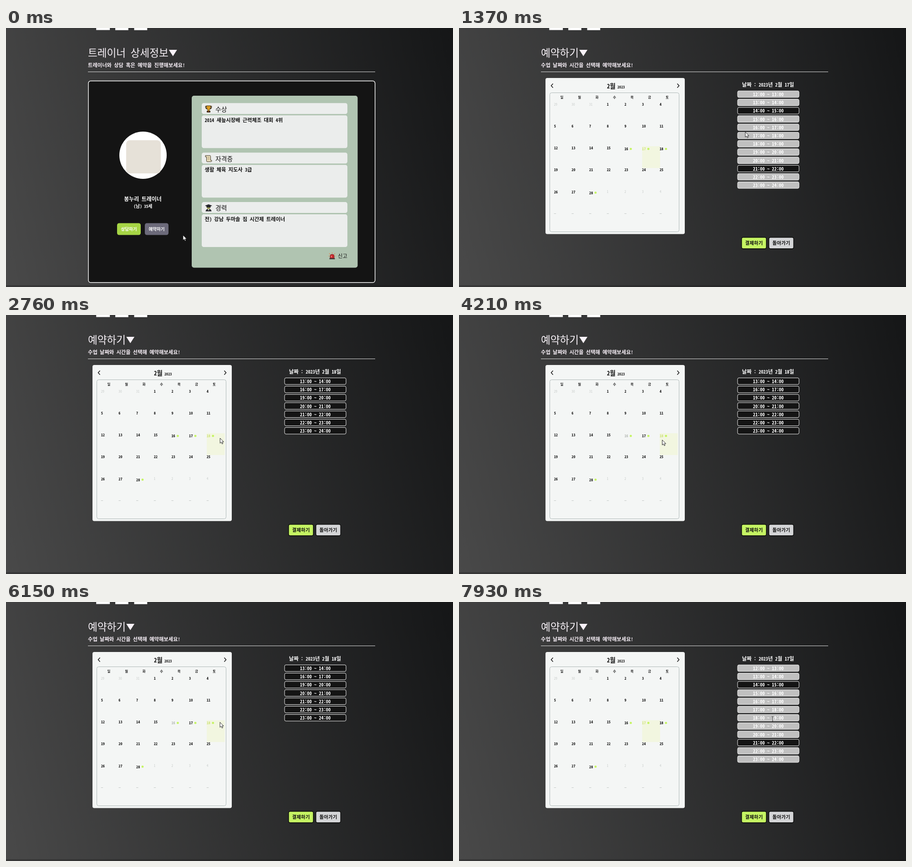
These frames come from a looping animation (982x570 px, 8 s). An HTML page:

```html
<!DOCTYPE html>
<html lang="ko">
<head>
<meta charset="utf-8">
<title>예약하기</title>
<style>
html, body { margin: 0; width: 100%; height: 100%; overflow: hidden; }
body { background: linear-gradient(75deg, #494949, #151617); }
svg { display: block; width: 982px; height: 570px; }
text {
  font-family: "Noto Sans Mono CJK KR", "Noto Sans CJK KR", "Noto Sans CJK", monospace;
  font-weight: 700;
  white-space: pre;
}
.plain { font-weight: 400; }
.hangul { font-size: 1.087em; }
.status { font: 400 9px "Open Sans", "Noto Sans", sans-serif; }
</style>
</head>
<body>
<svg viewBox="0 0 982 570">
  <g id="page"></g>
  <g id="cursor"></g>
</svg>
<script>
const LOOP = 8000, PAGE_AT = 340, LOADED_AT = 740;
const DARK = '#141414', WHITE = '#fff', LIME = '#c5f463';

// Hangul syllables are 0.92 em wide in the font; enlarge them to a full em cell
const fullWidth = str => String(str).replace(/[가-힣]+/g, s => `<tspan class="hangul">${s}</tspan>`);
// y is the vertical middle of the text
const text = (x, y, size, str, fill = WHITE, extra = '') =>
  `<text x="${x}" y="${y + size * 0.38}" style="font-size:${size}px" fill="${fill}" ${extra}>${fullWidth(str)}</text>`;
const plain = (x, y, size, str, fill) => text(x, y, size, str, fill, 'class="plain"');
const mid = (x, y, size, str, fill) => text(x, y, size, str, fill, 'text-anchor="middle"');
const rect = (x, y, w, h, r, fill, stroke = 'none', sw = 1) =>
  `<rect x="${x}" y="${y}" width="${w}" height="${h}" rx="${r}" fill="${fill}" stroke="${stroke}" stroke-width="${sw}"/>`;
const path = (d, fill, stroke = 'none', sw = 1) =>
  `<path d="${d}" fill="${fill}" stroke="${stroke}" stroke-width="${sw}"/>`;
const circle = (x, y, r, fill) => `<circle cx="${x}" cy="${y}" r="${r}" fill="${fill}"/>`;
const at = (x, y, body) => `<g transform="translate(${x} ${y})">${body}</g>`;

function header(title, note) {
  const end = 180 + title.length * 20.8 - (title.includes(' ') ? 10.4 : 0);
  return rect(0, 566, 982, 4, 0, 'rgba(20,20,20,.3)') +
    text(192, -14.5, 41.5, '블롬름') +
    plain(180, 55, 20.8, title, '#f8f2f8') +
    path(`M${end + 1} 48h18l-9 14z`, '#f8f2f8') +
    text(180, 82, 10.4, note, '#f8f0f8') +
    rect(180, 96, 631, 1, 0, '#dcdcdc');
}

// Icons are drawn from their upper left corner, about 16 px wide
const icons = {
  trophy:
    path('M4 2H1.5Q1 7 5 8M12 2h2.5Q15 7 11 8', 'none', '#3a2a10', 1.5) +
    path('M3.5 .8h9Q13 8 9.3 10v2h2.2v3h-7v-3h2.2v-2Q3 8 3.5 .8z', '#d99a22', '#3a2a10') +
    rect(4.5, 12.6, 7, 2.4, 0, '#4a2c18'),
  scroll:
    path('M1 1.5h10q1.5 0 1.5 2V12H15v1.5q0 1.5-1.5 1.5H5q-1.5 0-1.5-1.5V4.5H1z', '#eadfbe', '#3c3426') +
    path('M5.5 5h5M5.5 7.5h5M5.5 10h5', 'none', '#a08c60', .8),
  graduate:
    path('M1.5 15.5Q2 10 8 10t6.5 5.5z', '#2b2b30') +
    circle(8, 7, 3.6, '#9a9a50') +
    path('M0 3l8-3 8 3-3.5 1.5V7h-9V4.5z', '#26262c') +
    path('M6 10.5h4L8 14z', '#e8e8e0'),
  siren:
    path('M4 13V8q0-4 4.5-4T13 8v5z', '#c8282c', '#6c2020', .8) +
    rect(2.5, 12.5, 12, 2.5, .5, '#443c3c') +
    path('M8.5 0v2M2 2l2 2M15 2l-2 2M0 8h2.5M17 8h-2.5', 'none', '#e08850', 1.2) +
    rect(6, 7, 2, 4, .8, '#ee7c78')
};

function profile() {
  const sections = [
    ['trophy', '수상', '2014 새늪시장배 근력체조 대회 4위'],
    ['scroll', '자격증', '생활 체육 지도사 3급'],
    ['graduate', '경력', '전) 강남 두마솔 짐 시간제 트레이너']
  ];
  return header('트레이너 상세정보', '트레이너와 상담 혹은 예약을 진행해보세요!') +
    rect(181, 116.5, 629.7, 443.7, 5, DARK, WHITE, 1.4) +
    circle(301, 280, 52, WHITE) +
    rect(264, 247, 76, 73, 8, '#e6e1d8') +
    mid(300.5, 377, 11, '봉누리 트레이너') +
    mid(301, 392.5, 9.1, '(남) 35세') +
    rect(244, 429.5, 52, 26, 4.5, '#a6d545') + mid(270, 443, 8.8, '상담하기') +
    rect(305, 429.5, 52, 26, 4.5, '#6c6a7a') + mid(331, 443, 8.8, '예약하기') +
    rect(408, 149, 364.5, 378.5, 5, '#b0c4b1') +
    sections.map(([icon, name, line], i) => {
      const y = 165.3 + i * 108.9;
      return rect(430, y, 320, 24, 4.5, '#ebedec') +
        rect(430, y + 27, 320, 72, 4.5, '#ebedec') +
        at(437, y + 5, icons[icon]) +
        plain(460, y + 13.5, 12.7, name, '#111') +
        text(436.5, y + 37.5, 10.4, line, '#111');
    }).join('') +
    at(708, 494, icons.siren) + plain(729, 502, 10.4, '신고', '#111');
}

// Clicks on a day: the list empties 70 ms later and refills after 140 ms
const clicks = [[LOADED_AT - 140, 17], [2330, 18], [5130, 28], [6100, 18], [7590, 17]];
const lastClick = t => Math.max(0, clicks.findLastIndex(c => c[0] <= t));

function calendar(t) {
  const picked = clicks[lastClick(t)][1], loaded = t >= LOADED_AT;
  let out = rect(190, 110, 306, 343.5, 4, '#f4f6f5') +
    rect(199.5, 142.5, 284, 306, 4, 'none', '#aeb8b8') +
    path('M206.5 122.5l-4 4.5 4 4.5M479.5 122.5l4 4.5-4 4.5', 'none', '#111', 1.5) +
    text(325, 128, 12.6, '2월', '#111') + text(348, 129.5, 8.2, '2023', '#111');
  [...'일월화수목금토'].forEach((d, c) => out += mid(226 + c * 38.55, 152, 6.8, d, '#222'));

  for (let n = 0; n < 42; n++) {
    const x = 208.7 + (n % 7) * 38.67, row = Math.floor(n / 7), y = 168 + row * 48.1;
    const day = n - 2, inside = day >= 1 && day <= 28;
    if (row === 5) { out += rect(x, 408, 4.5, 1, 0, '#c3c8c6'); continue; }
    if (!inside) { out += plain(x, y, 7.2, day < 1 ? day + 31 : day - 28, '#c6cac8'); continue; }
    const event = loaded && [16, 17, 18, 28].includes(day);
    if (day === picked) out += rect(x + .3, y - 4, 39.5, 48, 0, '#f2f6e0');
    const fill = day === picked ? '#cde278' : day === 16 && t >= 3460 && t < 7300 ? '#b4b8b4' : '#111';
    out += text(x, y + (event ? 2 : 0), 8.3, day, fill);
    if (event) out += circle(x + 14, y + 2, 2.4, LIME);
  }
  return out;
}

function slots(t) {
  const i = lastClick(t), [clickedAt, picked] = clicks[i], age = t - clickedAt;
  let out = mid(679, 125, 10.4, `날짜 : 2023년 2월 ${picked}일`);
  if (t < LOADED_AT || (age >= 70 && age < 140))
    return out + mid(679.5, 174, 9.1, '예약 가능한 시간이 없습니다.');
  const shown = age < 70 ? clicks[i - 1][1] : picked;
  const hours = shown === 17 ? Array.from({ length: 12 }, (_, k) => 12 + k) : [13, 16, 19, 20, 21, 22, 23];
  hours.forEach((h, k) => {
    const y = 138.4 + k * 18.2, open = shown !== 17 || h === 14 || h === 21;
    out += rect(612, y, 135, 14.4, 3, open ? DARK : '#c0c0c0', '#f2f2f2') +
      mid(679.5, y + 7.7, 10.4, `${h}:00 ~ ${h + 1}:00`);
  });
  return out;
}

function booking(t) {
  return header('예약하기', '수업 날짜와 시간을 선택해 예약해보세요!') +
    calendar(t) + slots(t) +
    rect(620.75, 460.75, 54.5, 25, 3.5, LIME, '#080808', 1.5) + mid(648, 473.5, 9.7, '결제하기', '#111') +
    rect(680.75, 460.75, 54.5, 25, 3.5, '#d4d5d7', '#080808', 1.5) + mid(708, 473.5, 9.7, '돌아가기', '#111');
}

const status = () => rect(-4, 558, 99, 16, 3, '#b9c3c9') +
  text(0, 567.5, 9, 'board/lessonscheduler', '#50565c', 'class="status"');

// Pointer shapes and route: time, x, y, shape from that time on
const shapes = {
  arrow: path('M0 0V11.2L2.6 8.8 4.4 12.8 6.3 12 4.6 8.2H8z', WHITE, '#111', .9),
  hand: path('M-1.2 1.2a1.2 1.2 0 0 1 2.4 0V6l4 .9q1.6.4 1.4 2l-.6 4.3-1 2.8H-.4L-4.3 10q.2-1.7 1.8-.9l1.3 1.2z', WHITE, '#111', .9),
  beam: path('M-2 -6h1.5l.5.5.5-.5H2M0 -5.5V5.5M-2 6h1.5l.5-.5.5.5H2', 'none', '#222', 1)
};
const route = [
  [0, 389, 456, 'arrow'], [60, 385, 455, 'arrow'], [200, 334, 441, 'hand'], [340, 324, 436, 'arrow'],
  [400, 323, 435, 'arrow'], [740, 323, 435, 'arrow'], [1370, 629, 229, 'arrow'], [1510, 632, 226, 'arrow'],
  [1580, 632, 226, 'arrow'], [2190, 452, 275, 'arrow'], [2330, 455, 275, 'arrow'], [2620, 460, 273, 'arrow'],
  [2760, 470, 271, 'arrow'], [2970, 528, 268, 'arrow'], [3180, 470, 274, 'arrow'], [3390, 374, 274, 'arrow'],
  [3460, 374, 274, 'arrow'], [3600, 406, 276, 'arrow'], [3800, 406, 276, 'arrow'], [3940, 446, 275, 'arrow'],
  [4210, 446, 275, 'arrow'], [4420, 550, 262, 'arrow'], [4800, 249, 365, 'arrow'], [4980, 284, 368, 'arrow'],
  [5130, 292, 366, 'hand'], [5270, 296, 364, 'hand'], [5470, 406.5, 299, 'hand'], [5540, 414, 294, 'arrow'],
  [5820, 448, 272, 'arrow'], [6100, 452, 270, 'arrow'], [6630, 640, 214, 'arrow'], [6770, 624, 222, 'arrow'],
  [6910, 624, 222, 'arrow'], [7040, 361, 285, 'arrow'], [7200, 330, 284, 'arrow'], [7400, 410, 272, 'arrow'],
  [7590, 425, 272, 'arrow'], [7660, 470, 270, 'arrow'], [7860, 660, 259, 'beam'], [7930, 689, 258, 'beam'],
  [LOOP, 689, 258, 'beam']
];

function pointer(t) {
  const i = route.findLastIndex(k => k[0] <= t);
  const [t0, x0, y0, shape] = route[i], [t1, x1, y1] = route[i + 1];
  const p = (t - t0) / (t1 - t0);
  return at(x0 + (x1 - x0) * p, y0 + (y1 - y0) * p, shapes[shape]);
}

const page = document.getElementById('page'), cursor = document.getElementById('cursor');
let last = '';
function draw() {
  const t = performance.now() % LOOP;
  const html = (t < PAGE_AT ? profile() : booking(t)) + (t >= 200 && t < 540 ? status() : '');
  if (html !== last) page.innerHTML = last = html;
  cursor.innerHTML = pointer(t);
  requestAnimationFrame(draw);
}
draw();
</script>
</body>
</html>
```
